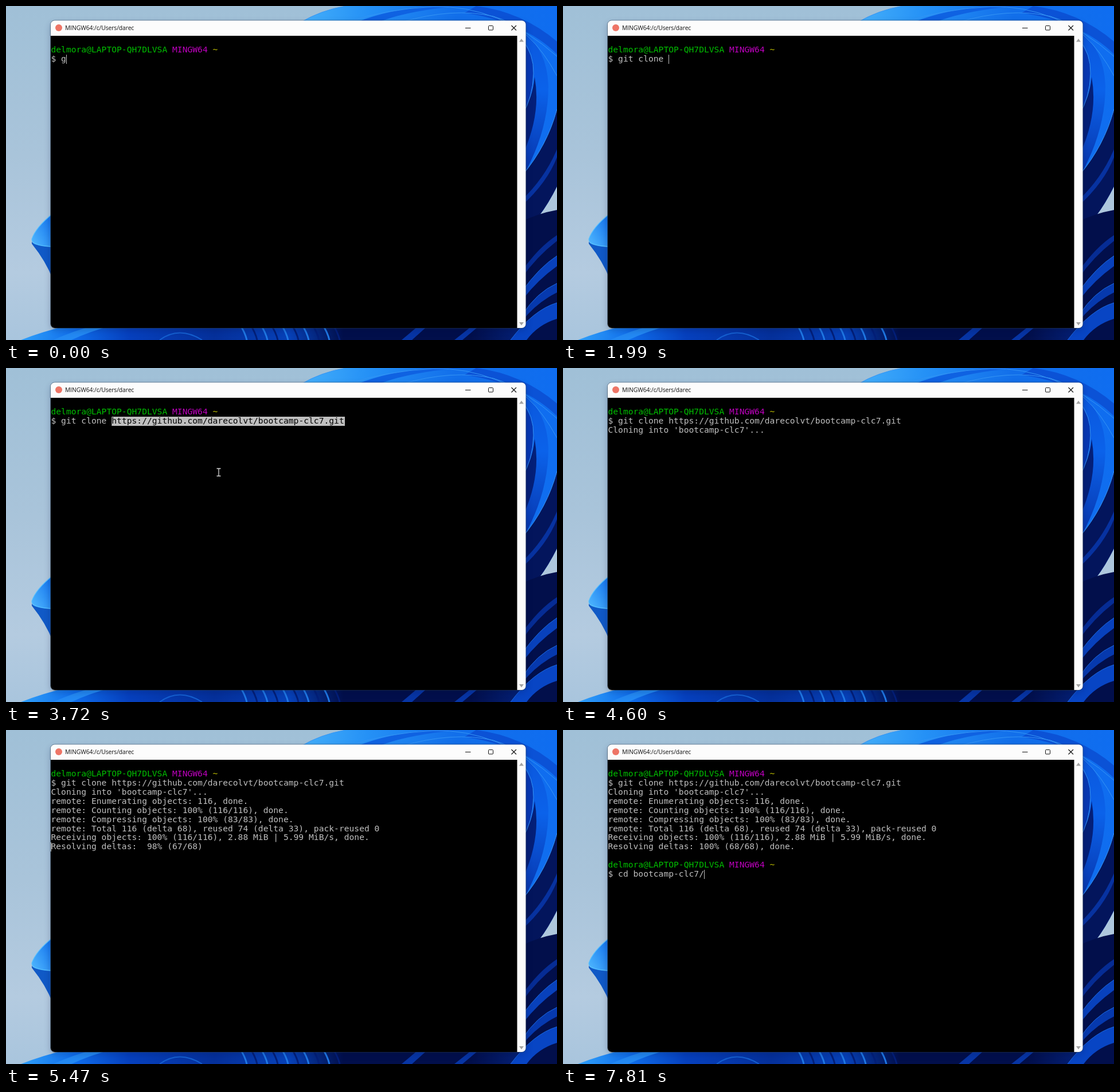
Recreate the animation shown at these times as an HTML page. Size 961 by 583 pixels, loop 8000 ms.

```html
<!DOCTYPE html>
<html lang="en">
<head>
<meta charset="utf-8">
<title>Terminal: git clone</title>
<style>
html, body { margin: 0; width: 100%; height: 100%; overflow: hidden; background: #a9c4d9; }
svg { display: block; width: 961px; height: 583px; }
.term text { font: 14.654px "DejaVu Sans Mono", monospace; white-space: pre; fill: #bfbfbf; }
.title { font: 10.4px "Open Sans", "Noto Sans", sans-serif; letter-spacing: -.12px; fill: #111; }
.line { fill: none; }
</style>
</head>
<body>
<svg viewBox="0 0 961 583">
  <defs>
    <linearGradient id="sky" x2="0" y2="1">
      <stop offset="0" stop-color="#a0c0d7"/><stop offset=".45" stop-color="#a9c4da"/>
      <stop offset=".8" stop-color="#b4cbe0"/><stop offset="1" stop-color="#a9c5dd"/>
    </linearGradient>
    <linearGradient id="top" gradientUnits="userSpaceOnUse" x1="520" y1="0" x2="961" y2="0">
      <stop offset="0" stop-color="#43aefa"/><stop offset=".25" stop-color="#2591f6"/>
      <stop offset=".6" stop-color="#126fea"/><stop offset="1" stop-color="#0f6df0"/>
    </linearGradient>
    <linearGradient id="rim" gradientUnits="userSpaceOnUse" x1="0" y1="20" x2="0" y2="300">
      <stop offset="0" stop-color="#0b55da"/><stop offset=".45" stop-color="#0b62ea"/>
      <stop offset="1" stop-color="#0732a8"/>
    </linearGradient>
    <linearGradient id="low" gradientUnits="userSpaceOnUse" x1="28" y1="0" x2="961" y2="0">
      <stop offset="0" stop-color="#2f9ffa"/><stop offset=".1" stop-color="#0f6cea"/>
      <stop offset=".2" stop-color="#0640bd"/><stop offset=".36" stop-color="#05309a"/>
      <stop offset=".5" stop-color="#0741b8"/><stop offset=".6" stop-color="#020f4b"/>
      <stop offset=".84" stop-color="#020f4b"/><stop offset="1" stop-color="#062c94"/>
    </linearGradient>
    <linearGradient id="petal" gradientUnits="userSpaceOnUse" x1="44" y1="400" x2="80" y2="380">
      <stop offset="0" stop-color="#47aefc"/><stop offset="1" stop-color="#1878ee"/>
    </linearGradient>
    <clipPath id="win"><rect x="78" y="25.500" width="828.5" height="536.500" rx="7"/></clipPath>
    <filter id="soft" x="-10%" y="-10%" width="120%" height="120%"><feGaussianBlur stdDeviation="6"/></filter>
  </defs>

  <rect width="961" height="583" fill="url(#sky)"/>

  <!-- backdrop: upper and right folds -->
  <path d="M515 28Q548 8 592 0H961V315Q946 345 930 366L900 380V28Z" fill="url(#top)"/>
  <path d="M612 28Q668 6 742 0H790Q700 8 650 28Z" fill="#0f62e2"/>
  <path d="M820 0Q900 10 961 62V84Q905 28 800 12Z" fill="#0b52d6"/>
  <path d="M900 42Q944 76 946 140Q946 220 900 300Z" fill="url(#rim)"/>
  <path d="M900 62Q921 84 920 118Q919 160 900 190Z" fill="#0738b4"/>
  <path d="M900 184Q918 164 922 124Q934 190 900 262Z" fill="#041f78"/>
  <path d="M961 180Q944 244 900 296V384L930 366Q946 345 961 315Z" fill="#03155c"/>
  <path d="M961 250Q940 300 900 338V348Q944 308 961 264Z" fill="#0732a0"/>
  <g class="line" stroke="#3595f5">
    <path d="M515 28Q548 8 592 0"/>
    <path d="M596 28Q660 6 745 1Q860 -2 961 88"/>
    <path d="M690 28Q780 2 850 18Q915 36 961 122"/>
    <path d="M900 58Q921 84 920 118Q919 160 900 190"/>
    <path d="M961 180Q944 244 900 296"/>
  </g>

  <!-- backdrop: bottom edge -->
  <path d="M26 583Q64 568 114 556H961V583Z" fill="url(#low)"/>
  <path d="M82 583Q120 566 160 556H190Q146 568 114 583Z" fill="#2389f3"/>
  <path class="line" d="M268 583Q302 558 342 583" stroke="#1560d0" stroke-width="2"/>
  <g class="line" stroke-width="3" id="streaks"></g>
  <path d="M690 583L722 556H738L708 583ZM782 583L816 556H828L796 583Z" fill="#0735a5"/>

  <!-- backdrop: lower right -->
  <path d="M900 376Q928 362 961 356V583H880L900 560Z" fill="#020f4b"/>
  <path d="M900 462Q930 420 961 400V410Q925 438 900 474Z" fill="#062c94"/>
  <path d="M900 498Q930 456 961 436V454Q925 480 900 514Z" fill="#0841bc"/>
  <path d="M900 540Q925 500 961 484V500Q925 518 900 550Z" fill="#0639ae"/>
  <path d="M880 583Q920 530 961 518V546Q928 556 908 583Z" fill="#0845c4"/>
  <path class="line" d="M900 498Q930 456 961 436M900 540Q925 500 961 484M880 583Q920 530 961 518" stroke="#1c68de"/>

  <!-- backdrop: left petal -->
  <path d="M82 362Q52 386 45 407Q46 416 54 419L82 422Z" fill="url(#petal)"/>
  <path d="M45 411Q48 419 82 421V478Q70 446 45 415Z" fill="#1059c6"/>
  <path class="line" d="M82 362Q52 386 45 407Q44 418 82 420" stroke="#55c0ff" stroke-width="1.2"/>

  <!-- window -->
  <rect x="77" y="29" width="831" height="537" rx="9" fill="#001030" opacity=".2" filter="url(#soft)"/>
  <rect x="77.500" y="25" width="829.500" height="537.500" rx="7.500" class="line" stroke="#2a3a4c" stroke-opacity=".5"/>
  <g clip-path="url(#win)">
    <rect x="78" y="25" width="829" height="537" fill="#fcfcfc"/>
    <rect x="78" y="52" width="813.500" height="510" fill="#000"/>
  </g>
  <circle cx="92" cy="38" r="6" fill="#ee7566"/>
  <text class="title" x="103" y="42">MINGW64:/c/Users/darec</text>
  <g class="line" stroke="#111">
    <path d="M801 38.500H810.500"/>
    <rect x="841.5" y="34.500" width="8" height="7.500" rx="1"/>
    <path d="M881.500 34L890 42.500M890 34L881.500 42.500" stroke-width="1.15"/>
  </g>
  <path d="M895 62.500L899 57L903 62.500ZM895 552L899 557.500L903 552Z" fill="#a3a3a3"/>

  <g class="term">
    <rect id="mark" fill="#bfbfbf"/>
    <g id="rows"></g>
    <rect id="caret" width="1" height="16" fill="#bfbfbf"/>
  </g>
  <g id="mouse" class="line">
    <path d="M-3.500 -6.500H3.500M-3.500 6.500H3.500M0 -6.500V6.500" stroke="#d8d8d8" stroke-width="1.3"/>
  </g>
</svg>
<script>
const NS = 'http://www.w3.org/2000/svg';
const LOOP = 8000, X0 = 78.47, CELL = 8.822, TOP = 69.2, ROW = 15.87;
const $ = id => document.getElementById(id);

const make = (tag, parent, attrs = {}) => {
  const el = parent.appendChild(document.createElementNS(NS, tag));
  set(el, attrs);
  return el;
};
function set(el, attrs) {
  for (const k in attrs) el.setAttribute(k, attrs[k]);
}
const colX = c => X0 + c * CELL;
const rowY = r => TOP + r * ROW;

for (let i = 0; i < 10; i++) {
  const x = 408 + i * 18;
  make('path', $('streaks'), { d: `M${x} 556Q${x + 9} 570 ${x + 12} 583`, stroke: i % 2 ? '#031f78' : '#1f78e4' });
}

const PROMPT = [['delmora@LAPTOP-QH7DLVSA ', '#00bf00'], ['MINGW64 ', '#bf00bf'], ['~', '#bfbf00']];
const URL_TEXT = 'https://github.com/darecolvt/bootcamp-clc7.git';
const CLONE = 'git clone ';
const CD = 'cd bootcamp-clc7/';
const PASTE = 2720, ENTER = 3970, NEXT = 5960;

// Time of each key press, in order
const cloneKeys = [0, 120, 370, 490, 1240, 1360, 1500, 1620, 1740, 1990];
const cdKeys = [6580, 6700, 6820, 7440, 7560];
const TAB = 7810;

const output = [
  [4090, "Cloning into 'bootcamp-clc7'..."],
  [4850, 'remote: Enumerating objects: 116, done.'],
  [4850, 'remote: Counting objects: 100% (116/116), done.'],
  [5100, 'remote: Compressing objects: 100% (83/83), done.'],
  [5470, 'remote: Total 116 (delta 68), reused 74 (delta 33), pack-reused 0'],
  [5470, 'Receiving objects: 100% (116/116), 2.88 MiB | 5.99 MiB/s, done.'],
  [5590, 'Resolving deltas: 100% (68/68), done.']
];
const caretOff = [[990, 1240], [2480, 2720], [3220, 3720], [4600, 4850], [6460, 6580], [7320, 7440]];

const count = (times, t) => times.filter(k => k <= t).length;

// Every line is a list of [text, colour] parts
function screenAt(t) {
  const selected = t >= PASTE && t < ENTER;
  const command = [['$ ' + CLONE.slice(0, count(cloneKeys, t))]];
  if (t >= PASTE) command.push([URL_TEXT, selected ? '#000' : '#bfbfbf']);
  const lines = [PROMPT, command];
  for (const [at, text] of output) if (t >= at) lines.push([[text]]);

  let row = lines.length, col = 0;
  if (t < ENTER) {
    row = 1;
    col = command.reduce((n, part) => n + part[0].length, 0);
  }
  if (t >= 5470 && t < 5590) lines.push([['Resolving deltas:  98% (67/68)']]);
  if (t >= NEXT) {
    const typed = '$ ' + (t >= TAB ? CD : CD.slice(0, count(cdKeys, t)));
    lines.push([], PROMPT, [[typed]]);
    row = lines.length - 1;
    col = typed.length;
  }
  return { lines, row, col, selected };
}

const rows = Array.from({ length: 12 }, (_, i) => make('text', $('rows'), { x: X0, y: rowY(i) + 12.1 }));
const drawn = [];

function drawRow(i, parts = []) {
  const key = JSON.stringify(parts);
  if (drawn[i] === key) return;
  drawn[i] = key;
  rows[i].textContent = '';
  for (const [text, color = '#bfbfbf'] of parts) {
    const span = make('tspan', rows[i]);
    span.style.fill = color;
    span.textContent = text;
  }
}

function draw(t) {
  const { lines, row, col, selected } = screenAt(t);
  rows.forEach((_, i) => drawRow(i, lines[i]));

  const start = 2 + CLONE.length;
  set($('mark'), {
    x: colX(start), y: 85, height: 16,
    width: selected ? URL_TEXT.length * CELL : 0
  });

  const hidden = caretOff.some(([a, b]) => t >= a && t < b);
  set($('caret'), {
    x: Math.round(colX(col)), y: Math.round(rowY(row)),
    visibility: hidden ? 'hidden' : 'visible'
  });

  const step = Math.min(3, Math.floor((t - 2240) / 120));
  const rest = ((3 - step) / 3) ** 2;
  set($('mouse'), {
    transform: `translate(${371 + 44 * rest} ${182 + 38 * rest})`,
    visibility: t >= 2240 && t < ENTER ? 'visible' : 'hidden'
  });
}

const began = performance.now();
function tick() {
  draw((performance.now() - began) % LOOP);
  requestAnimationFrame(tick);
}
tick();
</script>
</body>
</html>
```
